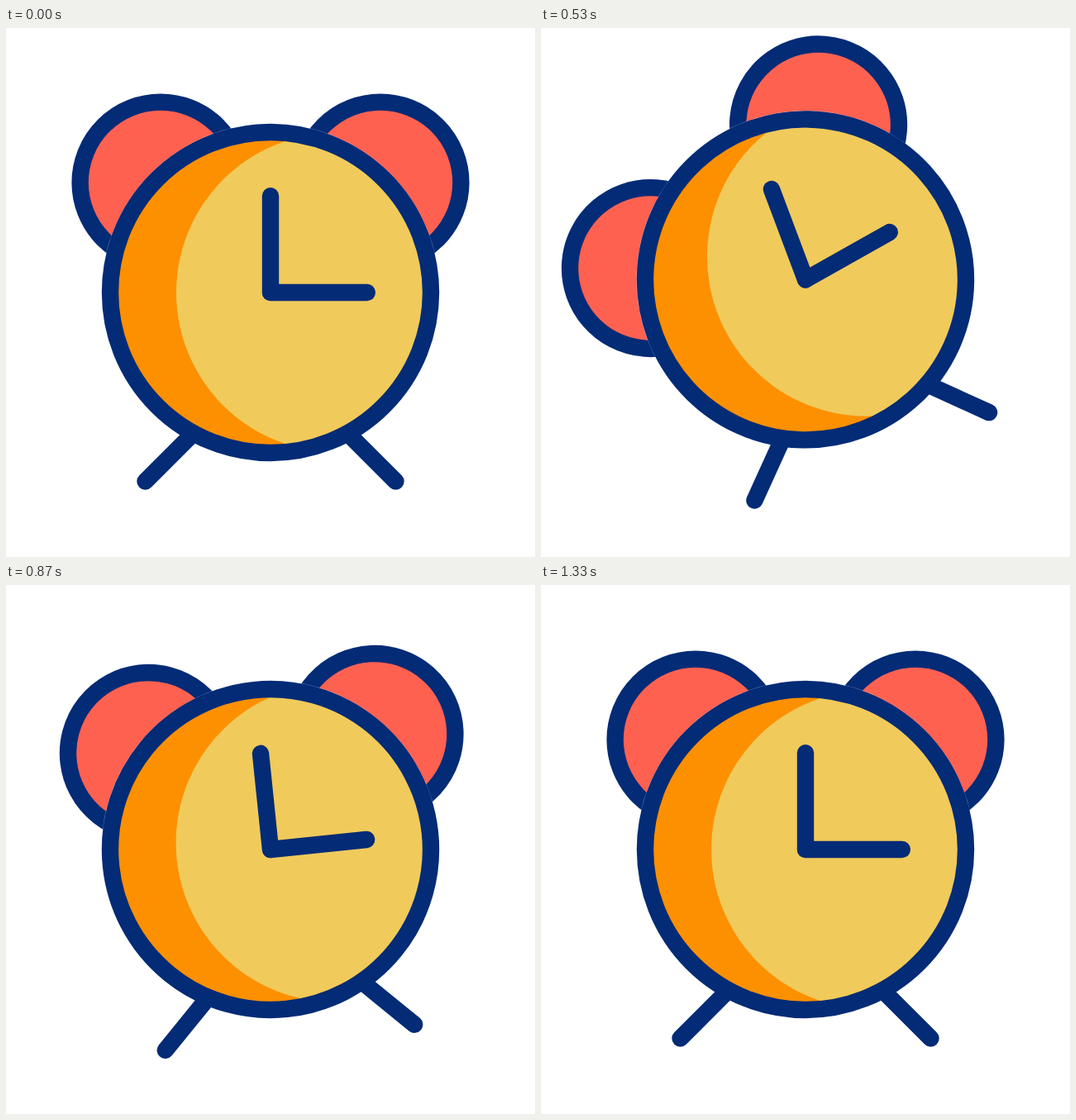
An HTML page that plays this animation: 640x640 px, repeating every 1670 ms.

```html
<!DOCTYPE html>
<html lang="en">
<head>
<meta charset="utf-8">
<title>Alarm clock</title>
<style>
  html, body { margin: 0; height: 100%; overflow: hidden; background: #fff; }
  svg { display: block; width: 100%; height: 100%; }
</style>
</head>
<body>
<svg viewBox="-320 -320 640 640">
  <defs>
    <clipPath id="dial"><circle r="194"/></clipPath>
  </defs>
  <g id="clock" fill="none" stroke="#032b76" stroke-width="20.4" stroke-linecap="round">
    <g fill="#ff6151">
      <circle id="leftEar" cx="-133" cy="-133" r="97.4"/>
      <circle id="rightEar" cx="133" cy="-133" r="97.4"/>
    </g>
    <circle r="204.2" stroke="#fff" stroke-width=".4"/>
    <path d="M-151.5 228.5l60-60M151.5 228.5l-60-60"/>
    <circle r="194" fill="#fd9000" stroke="none"/>
    <circle cx="79" r="193" fill="#f0ca5b" stroke="none" clip-path="url(#dial)"/>
    <circle r="194"/>
    <path id="minute" d="M0 0V-116.8"/>
    <path id="hour" d="M0 0H116.8"/>
  </g>
</svg>
<script>
const FPS = 30, LOOP = 1670;
const BEATS = [14.9, 21, 26, 31, 36];  // turning points of the shake, in frames

function ease(x) {
  const u = Math.min(1, Math.max(0, x));
  return u * u * (3 - 2 * u);
}

// Swings left, then back and forth at half the angle each time until it rests.
function shake(frame, angle, lag = 0) {
  let start = 0, from = 0, to = -angle;
  for (const [i, beat] of BEATS.entries()) {
    const end = beat + lag;
    if (i === BEATS.length - 1) to = 0;
    if (frame < end) return from + (to - from) * ease((frame - start) / (end - start));
    [start, from, to] = [end, to, -to / 2];
  }
  return 0;
}

const setTransform = (id, value) =>
  document.getElementById(id).setAttribute('transform', value);
const rotate = (id, angle) => setTransform(id, `rotate(${angle})`);

function draw(time) {
  // Frame times are rounded to 10 ms, hence the small lead.
  const frame = Math.floor((time % LOOP + 3.4) * FPS / 1000);
  const hop = 17 * (ease((frame - 14) / 11.3) - ease(frame / 11.3));
  setTransform('clock', `translate(0 ${hop}) rotate(${shake(frame, 23.6)})`);
  rotate('leftEar', shake(frame, 20.3, 1.75));
  rotate('rightEar', shake(frame, 20.1, 2.6));
  rotate('minute', 360 * ease(frame / 14.5));
  rotate('hour', 360 * ease(frame / 17.65));
}

const startTime = performance.now();
function tick() {
  draw(performance.now() - startTime);
  requestAnimationFrame(tick);
}
tick();
</script>
</body>
</html>
```
